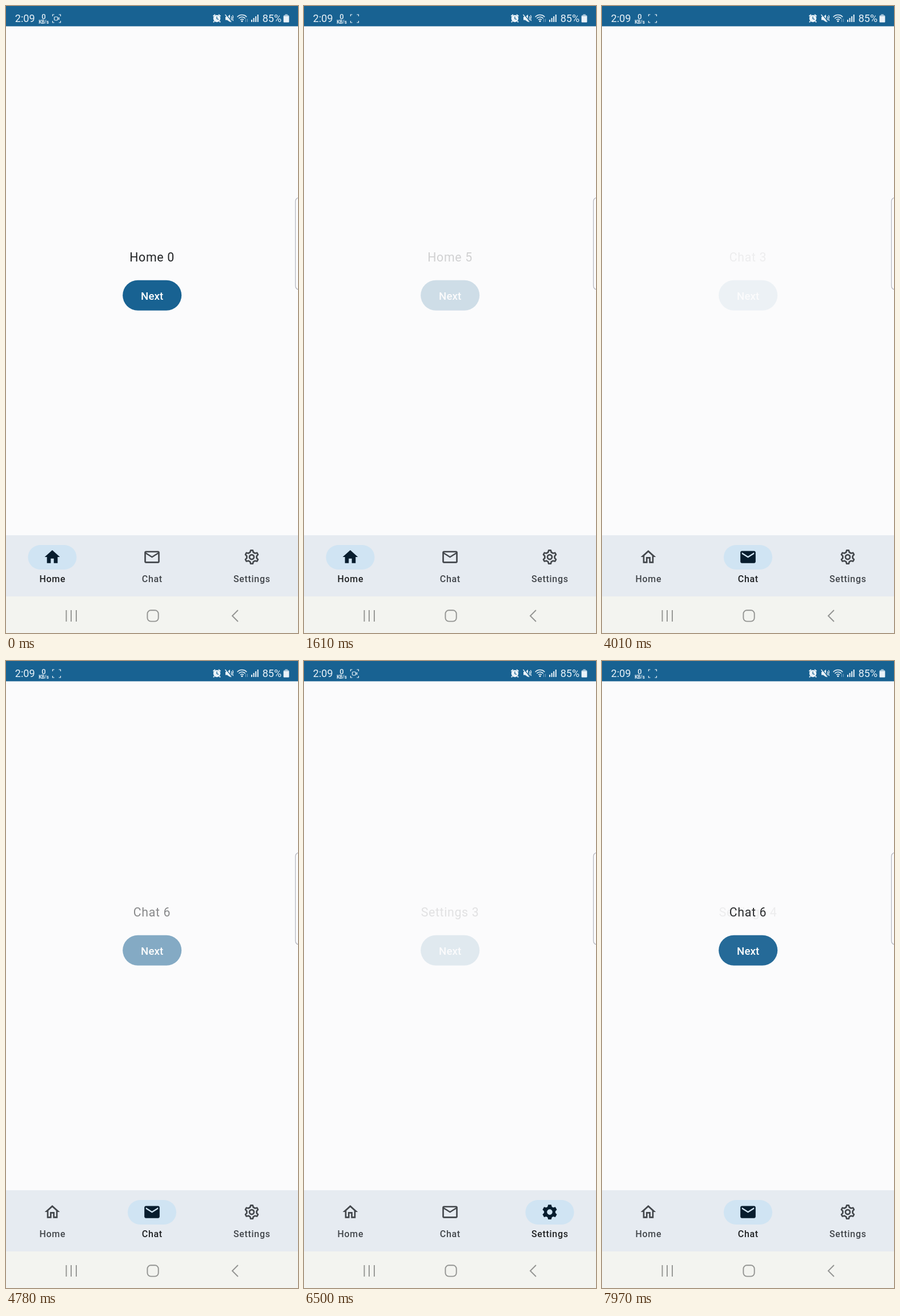
Animation, 511 px wide and 1097 px high, one loop 8000 ms. Source, as an HTML page with a canvas:

```html
<!DOCTYPE html>
<html lang="en">
<head>
<meta charset="utf-8">
<title>Tab navigation</title>
<style>
  html, body { margin: 0; width: 100%; height: 100%; overflow: hidden; background: #fbfbfc; }
  canvas { display: block; width: 100%; height: 100%; }
</style>
</head>
<body>
<canvas id="stage" width="511" height="1097"></canvas>
<script>
const W = 511, H = 1097, LOOP = 8000, FADE = 700;
const FONT = 'Roboto, "Noto Sans", sans-serif';
const PAGE = '#fbfbfc', PRIMARY = '#186292', INK = '#202224', MUTED = '#43474c', ACTIVE = '#071d2e';
const ctx = document.getElementById('stage').getContext('2d');
const layer = document.createElement('canvas');
layer.width = W;
layer.height = 140;
const lctx = layer.getContext('2d');
const LAYER_Y = 410;

const clamp = v => Math.min(1, Math.max(0, v));

// cubic-bezier(0.4, 0, 0.2, 1)
function ease(x) {
  x = clamp(x);
  let lo = 0, hi = 1;
  for (let i = 0; i < 24; i++) {
    const s = (lo + hi) / 2, r = 1 - s;
    if (1.2 * r * r * s + 0.6 * r * s * s + s * s * s < x) lo = s; else hi = s;
  }
  return 3 * (1 - lo) * lo * lo + lo * lo * lo;
}

// Screens in order of appearance
const screens = [{ at: -FADE, text: 'Home 0' }];
const visit = (name, first, times) =>
  times.forEach((at, i) => screens.push({ at, text: name + ' ' + (first + i) }));
visit('Home', 1, [270, 565, 860, 1155, 1450, 1710]);
visit('Chat', 0, [2610, 3485, 3700, 3912, 4120, 4325, 4530]);
visit('Settings', 0, [5300, 5880, 6125, 6370, 6615]);
visit('Chat', 6, [7480]);

const tabs = [
  { name: 'Home', x: 81 },
  { name: 'Chat', x: 255.5 },
  { name: 'Settings', x: 430 }
];
const picks = [
  { at: -1000, tab: 0 }, { at: 2610, tab: 1 }, { at: 5300, tab: 2 }, { at: 7480, tab: 1 }
];

const icons = {
  Home: [
    'M12 5.69l5 4.5V18h-2v-6H9v6H7v-7.81zM12 3L2 12h3v8h6v-6h2v6h6v-8h3z',
    'M10 20v-6h4v6h5v-8h3L12 3 2 12h3v8z'
  ],
  Chat: [
    'M22 6c0-1.1-.9-2-2-2H4c-1.1 0-2 .9-2 2v12c0 1.1.9 2 2 2h16c1.1 0 2-.9 2-2zm-2 0l-8 5-8-5zm0 12H4V8l8 5 8-5z',
    'M20 4H4c-1.1 0-2 .9-2 2v12c0 1.1.9 2 2 2h16c1.1 0 2-.9 2-2V6c0-1.1-.9-2-2-2zm0 4l-8 5-8-5V6l8 5 8-5z'
  ]
};
for (const key in icons) icons[key] = icons[key].map(d => new Path2D(d));

function gear(outer, half, base, baseHalf) {
  const p = new Path2D();
  for (let k = 0; k < 6; k++) {
    const a = k * Math.PI / 3, c = Math.cos(a), s = Math.sin(a);
    for (const [x, y] of [[-baseHalf, -base], [-half, -outer], [half, -outer], [baseHalf, -base]])
      p.lineTo(12 + x * c - y * s, 12 + x * s + y * c);
  }
  p.closePath();
  return p;
}
const gearLine = gear(8.75, 1.35, 6.27, 2.1);
const gearFull = gear(9.7, 2, 6.9, 2.85);
gearFull.moveTo(15.6, 12);
gearFull.arc(12, 12, 3.6, 0, 7);

function round(c, x, y, w, h, r) {
  c.beginPath();
  c.roundRect(x, y, w, h, r);
}

function label(c, text, x, y, size, color, weight = 400, gap = 0, align = 'center') {
  c.font = `${weight} ${size}px ${FONT}`;
  c.letterSpacing = gap + 'px';
  c.textAlign = align;
  c.fillStyle = color;
  c.fillText(text, x, y);
}

function line(points, width, color) {
  ctx.beginPath();
  points.forEach(([x, y]) => ctx.lineTo(x, y));
  ctx.lineWidth = width;
  ctx.strokeStyle = color;
  ctx.stroke();
}

function drawScreen(text, alpha) {
  if (alpha <= 0) return;
  lctx.clearRect(0, 0, W, layer.height);
  label(lctx, text, 255.5, 447 - LAYER_Y, 21.3, INK, 400, 0.67);
  round(lctx, 204.2, 479.7 - LAYER_Y, 103, 53, 26.5);
  lctx.fillStyle = PRIMARY;
  lctx.fill();
  label(lctx, 'Next', 255.7, 514 - LAYER_Y, 18.67, '#fff', 500, 0.13);
  ctx.globalAlpha = alpha;
  ctx.drawImage(layer, 0, LAYER_Y);
  ctx.globalAlpha = 1;
}

function drawContent(t) {
  let i = screens.length - 1;
  while (screens[i].at > t) i--;
  const now = screens[i], prev = screens[i - 1];
  const y = ease((t - now.at) / FADE);
  // A screen interrupted while fading in is dropped at once
  if (prev && now.at - prev.at >= FADE) drawScreen(prev.text, 1 - y);
  drawScreen(now.text, y);
}

function drawIcon(name, x, on) {
  ctx.save();
  ctx.translate(x - 16, 948.1);
  ctx.scale(4 / 3, 4 / 3);
  ctx.fillStyle = ctx.strokeStyle = on ? ACTIVE : MUTED;
  if (name !== 'Settings') {
    ctx.fill(icons[name][on ? 1 : 0], 'evenodd');
  } else if (on) {
    ctx.fill(gearFull, 'evenodd');
  } else {
    ctx.lineWidth = 2;
    ctx.lineJoin = 'round';
    ctx.stroke(gearLine);
    ctx.beginPath();
    ctx.arc(12, 12, 3, 0, 7);
    ctx.stroke();
  }
  ctx.restore();
}

function drawRipple(x, age) {
  if (age < 0 || age > 420) return;
  ctx.save();
  round(ctx, x - 42.5, 943, 85, 43, 21.5);
  ctx.clip();
  ctx.globalAlpha = 0.13 * clamp(age / 75) * clamp((420 - age) / 150);
  ctx.fillStyle = '#0b1f30';
  ctx.beginPath();
  ctx.arc(x, 964.5, 14 + 34 * ease(age / 200), 0, 7);
  ctx.fill();
  ctx.restore();
}

function drawTabs(t) {
  ctx.fillStyle = '#e6ebf1';
  ctx.fillRect(0, 926, W, 107);
  let i = picks.length - 1;
  while (picks[i].at > t) i--;
  const p = ease((t - picks[i].at) / 100);
  tabs.forEach(({ name, x }, n) => {
    const on = n === picks[i].tab;
    const k = on ? p : i && n === picks[i - 1].tab ? 1 - p : 0;
    if (k > 0) {
      ctx.globalAlpha = k;
      ctx.fillStyle = '#d0e4f3';
      round(ctx, x - 42.5 * k, 943, 85 * k, 43, 21.5);
      ctx.fill();
      ctx.globalAlpha = 1;
    }
    picks.forEach(pick => { if (pick.tab === n) drawRipple(x, t - pick.at + 60); });
    drawIcon(name, x, on);
    label(ctx, name, x + 0.3, 1008, 16, on ? INK : MUTED, 500, 0.67);
  });
}

function drawSystemBar() {
  const gray = '#939492';
  ctx.fillStyle = '#f3f4f0';
  ctx.fillRect(0, 1033, W, 64);
  for (const x of [105.5, 114, 123]) line([[x, 1057], [x, 1077]], 1.9, gray);
  round(ctx, 247.4, 1057.3, 19.3, 19.3, 6);
  ctx.stroke();
  line([[406, 1057], [396, 1067], [406, 1077]], 1.9, gray);
}

function drawStatus(t) {
  const white = '#e9f2f8', dim = '#6f9dbd';
  ctx.fillStyle = PRIMARY;
  ctx.fillRect(0, 0, W, 35.5);
  label(ctx, '2:09', 15.8, 28, 18, white, 400, 0, 'left');
  label(ctx, '0', 66, 23, 13, white, 500);
  label(ctx, 'KB/s', 66, 31, 8.2, white, 700);

  // Recorder badge
  for (const sx of [-1, 1]) for (const sy of [-1, 1])
    line([[88.5 + sx * 4, 22 + sy * 7], [88.5 + sx * 7, 22 + sy * 7], [88.5 + sx * 7, 22 + sy * 4]], 1.2, white);
  if (t % 2050 < 600) {
    round(ctx, 84.5, 19, 6, 6, 1.5);
    ctx.stroke();
    line([[90.5, 22], [93, 20], [93, 24], [90.5, 22]], 1, white);
  }

  // Alarm
  ctx.fillStyle = white;
  ctx.beginPath();
  ctx.arc(369, 22, 6.2, 0, 7);
  ctx.fill();
  line([[362.5, 18], [366, 15]], 2, white);
  line([[375.5, 18], [372, 15]], 2, white);
  line([[364.5, 26.5], [363, 28.5]], 2, white);
  line([[373.5, 26.5], [375, 28.5]], 2, white);
  line([[369, 18.5], [369, 22.3], [372, 23.5]], 1.3, PRIMARY);

  // Muted speaker
  ctx.beginPath();
  [[384, 19], [387, 19], [392, 15], [392, 28], [387, 24.5], [384, 24.5]].forEach(([x, y]) => ctx.lineTo(x, y));
  ctx.fill();
  line([[385, 14.5], [395, 27]], 1.3, PRIMARY);
  line([[383.5, 15], [394, 28]], 1.4, white);
  line([[394, 18], [395.5, 20], [394, 22.5], [395.5, 25]], 1.2, white);
  line([[396.5, 16], [397.7, 19.5], [396.5, 22.5], [397.7, 26]], 1.2, white);

  // Wi-Fi
  ctx.lineWidth = 1.5;
  for (const r of [4, 7.7, 11.4]) {
    ctx.beginPath();
    ctx.arc(413, 27, r, -Math.PI * 0.76, -Math.PI * 0.24);
    ctx.stroke();
  }
  ctx.beginPath();
  ctx.arc(413, 26.5, 1.6, 0, 7);
  ctx.fill();
  line([[419.5, 28], [419.5, 22.5]], 1.2, dim);
  line([[422.5, 28], [422.5, 22.5]], 1.2, dim);

  // Signal, battery
  for (let k = 0; k < 4; k++) {
    const h = 4 + 3 * k;
    ctx.fillRect(429 + k * 3.6, 28 - h, 2, h);
  }
  label(ctx, '85%', 448.7, 28, 18, white, 400, 0, 'left');
  ctx.fillStyle = '#a9c6da';
  ctx.fillRect(488.3, 14.5, 4.5, 2);
  round(ctx, 485.6, 16, 9.8, 12.8, 1.5);
  ctx.fill();
  ctx.fillStyle = white;
  ctx.fillRect(485.8, 18, 9.4, 10.3);
}

function drawHandle() {
  round(ctx, 506.5, 335.5, 20, 160.5, 6);
  ctx.fillStyle = PAGE;
  ctx.fill();
  ctx.lineWidth = 1.2;
  ctx.strokeStyle = '#b4b5be';
  ctx.stroke();
}

function draw(t) {
  ctx.fillStyle = PAGE;
  ctx.fillRect(0, 0, W, H);
  drawContent(t);
  drawTabs(t);
  drawSystemBar();
  drawStatus(t);
  drawHandle();
}

const start = performance.now();
function tick() {
  draw((performance.now() - start) % LOOP);
  requestAnimationFrame(tick);
}
tick();
</script>
</body>
</html>
```
